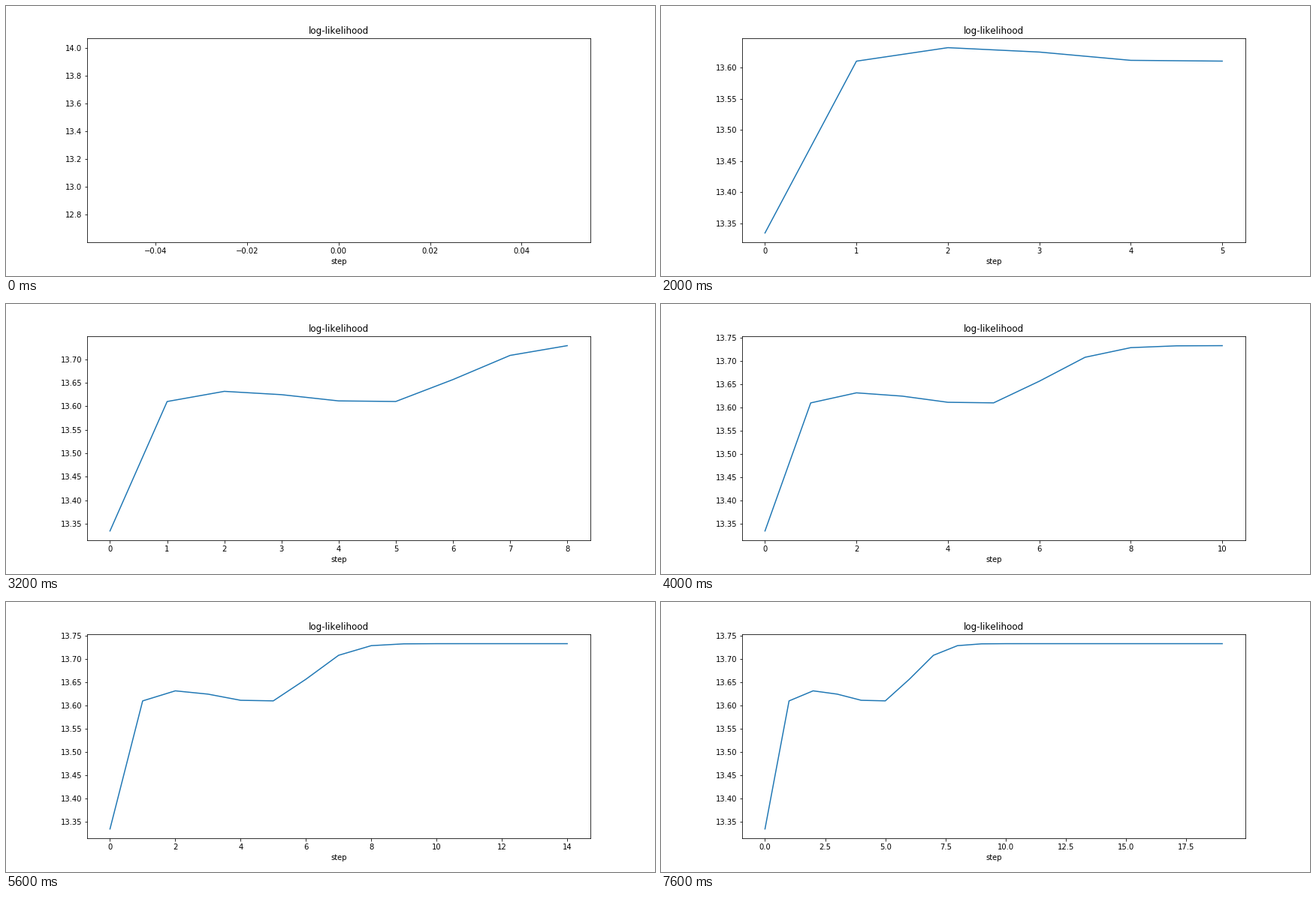
Recreate the animation shown at these times as a matplotlib script. Size 864 by 360 pixels, loop 8000 ms.

```python
import matplotlib.pyplot as plt
import numpy as np
from matplotlib.animation import FuncAnimation

STEPS = 20
INTERVAL = 400
LIMIT = 13.7329

plt.rcParams["text.kerning_factor"] = 6


def log_likelihood(t):
    """Fast first gain, a plateau with a shallow dip, then convergence."""
    first_gain = 0.3045 * np.exp(-2.369 * t)
    plateau = 0.0934 * np.exp(-(t / 3.66) ** 4.871)
    dip = 0.1238 * np.exp(-0.325 * (t - 4.78) ** 2)
    return LIMIT - first_gain - plateau - dip


fig, ax = plt.subplots(figsize=(12, 5), dpi=72, facecolor="white")
fig.subplots_adjust(left=0.125, right=0.9, bottom=0.125, top=0.88)


def draw(step):
    t = np.arange(step + 1)
    ax.clear()
    ax.set_title("log-likelihood")
    ax.set_xlabel("step")
    ax.plot(t, log_likelihood(t), color="#1f77b4", lw=1.5)


anim = FuncAnimation(fig, draw, frames=STEPS, init_func=lambda: draw(0),
                     interval=INTERVAL, repeat=True, repeat_delay=0)
plt.show()
```
